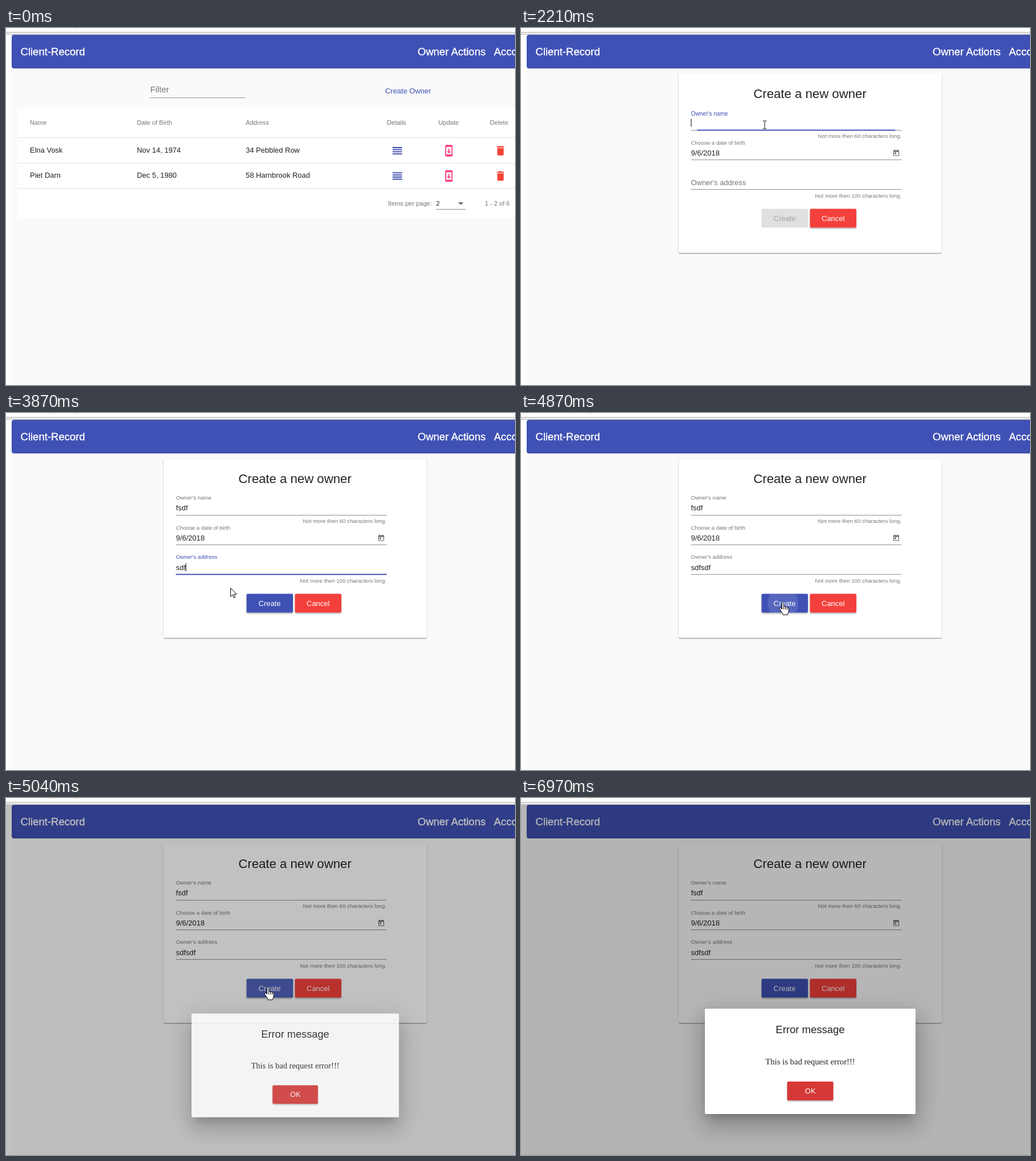
These frames come from a looping animation (894x627 px, 7750 ms). An HTML page:

```html
<!DOCTYPE html>
<html lang="en">
<head>
<meta charset="utf-8">
<title>Create owner</title>
<style>
  html, body { margin: 0; width: 100%; height: 100%; overflow: hidden; background: #fff; }
  #stage { position: relative; width: 894px; height: 627px; overflow: hidden; }
  #stage > *, #form > * { position: absolute; left: 0; top: 0; }
  svg { display: block; }
  text { font: 12.95px "Liberation Sans", Arial, sans-serif; fill: rgba(0,0,0,.87); white-space: pre; }
  .bar text { font-size: 18.55px; fill: #fff; stroke: #fff; stroke-width: .35px; }
  .small text, text.small { font-size: 11.1px; }
  .soft text, text.soft { fill: rgba(0,0,0,.54); }
  .tiny { font-size: 9.7px; fill: rgba(0,0,0,.54); }
  .end { text-anchor: end; }
  .mid { text-anchor: middle; }
  text.white { fill: #fff; }
  .rule { fill: #8f8f8f; }
  .blue, text.blue { fill: #3f51b5; }
  .raised { filter: drop-shadow(0 2px 1px rgba(0,0,0,.28)); }
  #card { left: 276.5px; top: 80.5px; width: 462px; height: 314px; background: #fff; border-radius: 2px;
    box-shadow: 0 2px 1px -1px rgba(0,0,0,.2), 0 1px 1px rgba(0,0,0,.14), 0 1px 3px rgba(0,0,0,.22); }
  #stage > #shade { top: 12px; width: 894px; height: 615px; background: #000; }
  #stage > #dialog { left: 322.5px; top: 370px; width: 370px; height: 185px; background: #fff; border-radius: 2px;
    box-shadow: 0 10px 14px -6px rgba(0,0,0,.2), 0 22px 35px 3px rgba(0,0,0,.14), 0 8px 43px 7px rgba(0,0,0,.12); }
</style>
</head>
<body>
<div id="stage">
  <svg width="894" height="627">
    <defs>
      <path id="lines" d="M3 15h18v-2H3zm0 4h18v-2H3zm0-8h18V9H3zm0-6v2h18V5z"/>
      <path id="update" d="M17 1H7c-1.1 0-2 .9-2 2v18c0 1.1.9 2 2 2h10c1.1 0 2-.9 2-2V3c0-1.1-.9-2-2-2zm0 18H7V5h10zm-1-6h-3V8h-2v5H8l4 4z"/>
      <path id="bin" d="M6 19c0 1.1.9 2 2 2h8c1.1 0 2-.9 2-2V7H6zM19 4h-3.5l-1-1h-5l-1 1H5v2h14z"/>
      <g id="icons">
        <use href="#lines" fill="#3546a8" transform="translate(676.2 0) scale(.925)"/>
        <use href="#update" fill="#ff4081" transform="translate(766.7 0) scale(.925)"/>
        <use href="#bin" fill="#f44336" transform="translate(857.4 0) scale(.925)"/>
      </g>
      <clipPath id="clipOpen"><rect x="651" y="94" width="111" height="34" rx="2"/></clipPath>
      <clipPath id="clipSave"><rect x="422.5" y="317.5" width="81.5" height="33" rx="2"/></clipPath>
    </defs>
    <path d="M82 0h3M122 0h3" stroke="#b9ab94"/>
    <rect y="7" width="894" height="1" fill="#b0b0b0"/>
    <rect y="8" width="894" height="2" fill="#f1f1f1"/>
    <rect y="10" width="894" height="2" fill="#d0d0d0"/>
    <rect x="10" y="60" width="884" height="567" fill="#fafafa"/>
    <g class="bar">
      <rect class="blue" x="10.5" y="12.5" width="900" height="58" rx="3" stroke="#394ba9"/>
      <text x="25.5" y="48">Client-Record</text>
      <text x="723" y="48">Owner Actions</text>
      <text x="857" y="48">Account Actions</text>
    </g>
    <g id="list">
      <text class="soft" x="253.5" y="113" style="font-size:14.8px">Filter</text>
      <rect class="rule" x="253" y="122" width="167" height="1"/>
      <g clip-path="url(#clipOpen)">
        <rect id="openHover" class="blue" x="651" y="94" width="111" height="34" opacity=".12"/>
        <circle id="openRipple" class="blue" cx="699" cy="122" opacity=".1"/>
      </g>
      <text class="blue" x="666" y="115">Create Owner</text>
      <rect x="20" y="141" width="874" height="193" fill="#fff"/>
      <path d="M20 192.500h874M20 237.500h874M20 281.500h874" stroke="#e0e0e0"/>
      <g class="small soft">
        <text x="42" y="170">Name</text><text x="230" y="170">Date of Birth</text><text x="421" y="170">Address</text>
        <text x="669" y="170">Details</text><text x="759.5" y="170">Update</text><text x="850" y="170">Delete</text>
        <text x="671" y="312">Items per page:</text><text x="841" y="312">1 - 2 of 6</text>
      </g>
      <text x="42" y="219">Elna Vosk</text><text x="230" y="219">Nov 14, 1974</text><text x="421" y="219">34 Pebbled Row</text>
      <text x="42" y="263">Piet Darn</text><text x="230" y="263">Dec 5, 1980</text><text x="421" y="263">58 Harnbrook Road</text>
      <use href="#icons" y="204.4"/><use href="#icons" y="248.8"/>
      <text class="small" x="755.5" y="312">2</text>
      <rect class="rule" x="755" y="318" width="52" height="1"/>
      <path d="M794 306h9.500l-4.750 5z" fill="#757575"/>
    </g>
  </svg>

  <div id="form">
    <div id="card"></div>
    <svg width="894" height="627">
      <text class="mid" x="507.5" y="123" style="font-size:22.2px">Create a new owner</text>
      <rect class="rule" x="298.5" y="179" width="370" height="1"/>
      <text class="tiny end" x="668" y="193">Not more then 60 characters long.</text>
      <text class="tiny" x="298.5" y="204.5">Choose a date of birth</text>
      <text x="298.5" y="224">9/6/2018</text>
      <path transform="translate(652.3 213) scale(.56)" fill="#666" d="M19 3h-1V1h-2v2H8V1H6v2H5c-1.1 0-2 .9-2 2v14c0 1.1.9 2 2 2h14c1.1 0 2-.9 2-2V5c0-1.1-.9-2-2-2zm0 16H5V8h14zM7 10h5v5H7z"/>
      <rect class="rule" x="298.5" y="231" width="370" height="1"/>
      <rect class="rule" x="298.5" y="283" width="370" height="1"/>
      <text class="tiny end" x="668" y="298">Not more then 100 characters long.</text>
      <g id="fields"></g>
      <rect id="save" x="422.5" y="317.5" width="81.5" height="33" rx="2"/>
      <g clip-path="url(#clipSave)"><circle id="saveRipple" fill="#fff" cx="460" cy="334"/></g>
      <text id="saveText" class="mid" x="463" y="338.5">Create</text>
      <rect class="raised" x="507.5" y="317.5" width="81.5" height="33" rx="2" fill="#f4403c"/>
      <text class="mid white" x="548.2" y="338.5">Cancel</text>
    </svg>
  </div>

  <div id="shade"></div>
  <div id="dialog">
    <svg width="370" height="185" viewBox="322.5 370 370 185">
      <text class="mid" x="507.5" y="413" style="font-size:18.5px">Error message</text>
      <text class="mid" x="507.5" y="468" style="font:14.7px 'Liberation Serif',serif">This is bad request error!!!</text>
      <rect class="raised" x="467" y="498" width="81" height="33" rx="2" fill="#d63838"/>
      <text class="mid white" x="507.7" y="519">OK</text>
    </svg>
  </div>

  <svg width="894" height="627">
    <g id="pointer">
      <circle id="halo" r="11" fill="#ffff3c" opacity=".72"/>
      <path id="arrow" fill="#fff" stroke="#000" d="M.5.5v15l3.400-3.200 2.300 5.200 2.300-1-2.300-5.100h4.800z"/>
      <path id="hand" fill="#fff" stroke="#000" d="M-1.500 1.500c0-2 3-2 3 0v6c.5-1.500 3-1 3 .5c.6-1.200 3-.8 3 .8c.8-1 2.700-.4 2.700 1.200v5c0 3-2 3.500-2 6.500h-8c0-2.500-1.500-3.500-2.800-5.500l-3-4.500c-.8-1.800 1.200-3 2.600-1.600l1.500 1.700zM4.500 8v4M7.500 9v3.500M1.500 7.500v4.500"/>
      <path id="beam" fill="none" stroke="#111" d="M-3.500-7h2.500l1 1 1-1h2.500M0-6v12M-3.500 7h2.500l1-1 1 1h2.500"/>
    </g>
  </svg>
</div>

<script>
const LOOP = 7750, STEP = 76.7, FIRST = 190;
const PAGE = 1640, DIALOG = 4879;
const $ = id => document.getElementById(id);
const show = (el, on) => { el.style.display = on ? '' : 'none'; };
const clamp = v => Math.min(1, Math.max(0, v));
const ramp = (t, start, len) => clamp((t - start) / len);

// cubic-bezier(.25, .8, .25, 1)
function swift(x) {
  if (x <= 0 || x >= 1) return clamp(x);
  let lo = 0, hi = 1, s;
  for (let i = 0; i < 24; i++) {
    s = (lo + hi) / 2;
    const v = .75 * s * (1 - s) + s * s * s;
    if (v < x) lo = s; else hi = s;
  }
  return 2.4 * s * (1 - s) ** 2 + 3 * s * s * (1 - s) + s ** 3;
}

// pointer stops: time, x, y, shape
const path = [
  [185, 774, 497, 'arrow'], [500, 764, 300, 'arrow'], [740, 752, 64, 'arrow'], [970, 756, 100, 'arrow'],
  [1200, 722, 112, 'hand'], [1400, 700, 120, 'hand'], [1600, 700, 120, 'arrow'], [1800, 640, 165, 'arrow'],
  [1960, 428, 170, 'beam'], [2640, 428, 170, 'arrow'], [2900, 388, 255, 'arrow'], [3060, 383, 262, 'arrow'],
  [3560, 383, 262, 'arrow'], [4020, 405, 350, 'arrow'], [4150, 430, 362, 'arrow'], [4330, 460, 333, 'hand'],
  [5300, 460, 333, 'arrow'], [5470, 462, 354, 'arrow'], [5710, 493, 411, 'beam'], [5780, 496, 418, 'arrow'],
  [6320, 519, 477, 'arrow'], [6500, 552, 505, 'arrow'], [6620, 541, 506, 'hand'], [6780, 541, 506, 'arrow'],
  [6870, 632, 558, 'arrow'], [6935, 632, 558, 'arrow']
];
const presses = [[1410, 1480], [2010, 2090], [3060, 3290], [4780, 4860]];

const fields = [
  { label: "Owner's name", text: 'fsdf', y: 171, line: 178.5, focus: 2030, blur: 3040, keys: [2330, 2430, 2550, 2650] },
  { label: "Owner's address", text: 'sdfsdf', y: 275.5, line: 282.5, focus: 3290, blur: 4780, keys: [3520, 3640, 3730, 3840, 3950, 4080] }
];
const LEFT = 298.5;

function make(tag, attrs) {
  const el = document.createElementNS('http://www.w3.org/2000/svg', tag);
  for (const k in attrs) el.setAttribute(k, attrs[k]);
  return $('fields').appendChild(el);
}
for (const f of fields) {
  f.labelEl = make('text', {});
  f.labelEl.textContent = f.label;
  f.textEl = make('text', { x: LEFT, y: f.y });
  f.lineEl = make('rect', { class: 'blue', y: f.line, height: 2 });
  f.caretEl = make('rect', { y: f.y - 11.5, width: 1, height: 14 });
}

function drawField(f, t) {
  const float = swift(ramp(t, f.focus, 400));
  const grow = swift(ramp(t, f.focus, 300));
  const active = t >= f.focus && t < f.blur;
  f.labelEl.setAttribute('transform', `translate(${LEFT} ${f.y - 19.5 * float}) scale(${1 - .25 * float})`);
  f.labelEl.style.fill = active ? '#3f51b5' : 'rgba(0,0,0,.54)';
  f.lineEl.setAttribute('x', LEFT + 185 * (1 - grow));
  f.lineEl.setAttribute('width', 370 * grow);
  f.lineEl.setAttribute('opacity', 1 - ramp(t, f.blur, 60));

  const typed = f.keys.filter(k => t >= k).length;
  const text = f.text.slice(0, typed);
  if (f.textEl.textContent !== text) f.textEl.textContent = text;
  const since = t - (typed ? f.keys[typed - 1] : f.focus);
  show(f.caretEl, active && Math.floor(since / 530) % 2 === 0);
  f.caretEl.setAttribute('x', Math.floor(LEFT + (typed ? f.textEl.getComputedTextLength() : 0)) + .5);
}

function ripple(el, t, start, size) {
  show(el, t >= start);
  el.setAttribute('r', size * (1 - (1 - ramp(t, start, 450)) ** 3));
}

function drawPointer(t) {
  const last = path[path.length - 1][0];
  const visible = t >= path[0][0] && t < last;
  show($('pointer'), visible);
  if (!visible) return;
  const i = path.findIndex(p => p[0] > t);
  const [t0, x0, y0, shape] = path[i - 1], [t1, x1, y1] = path[i];
  const u = (t - t0) / (t1 - t0);
  const x = Math.round(x0 + (x1 - x0) * u), y = Math.round(y0 + (y1 - y0) * u);
  $('pointer').setAttribute('transform', `translate(${x} ${y})`);
  for (const id of ['arrow', 'hand', 'beam']) show($(id), id === shape);
  show($('halo'), presses.some(([a, b]) => t >= a && t < b));
}

function draw(t) {
  const onForm = t >= PAGE;
  show($('list'), !onForm);
  show($('form'), onForm);
  show($('openHover'), t >= 1200);
  ripple($('openRipple'), t, 1386, 64);

  if (onForm) fields.forEach(f => drawField(f, t));
  const ready = t >= fields[1].keys[0];
  $('save').style.fill = ready ? '#3f51b5' : '#e0e0e0';
  $('save').classList.toggle('raised', ready);
  $('saveText').style.fill = ready ? '#fff' : 'rgba(0,0,0,.28)';
  ripple($('saveRipple'), t, 4757, 47);
  $('saveRipple').setAttribute('opacity', .12 * (1 - ramp(t, 4950, 350)));

  const open = swift(ramp(t, DIALOG, 400));
  $('shade').style.opacity = .288 * open;
  show($('dialog'), open > 0);
  $('dialog').style.opacity = open;
  $('dialog').style.transform = open < 1 ? `translateY(${25 * (1 - open)}%) scale(${.9 + .1 * open})` : 'none';
  drawPointer(t);
}

function tick() {
  const t = performance.now() % LOOP;
  draw(Math.max(0, FIRST + Math.floor((t - FIRST) / STEP) * STEP));
  requestAnimationFrame(tick);
}
tick();
</script>
</body>
</html>
```
